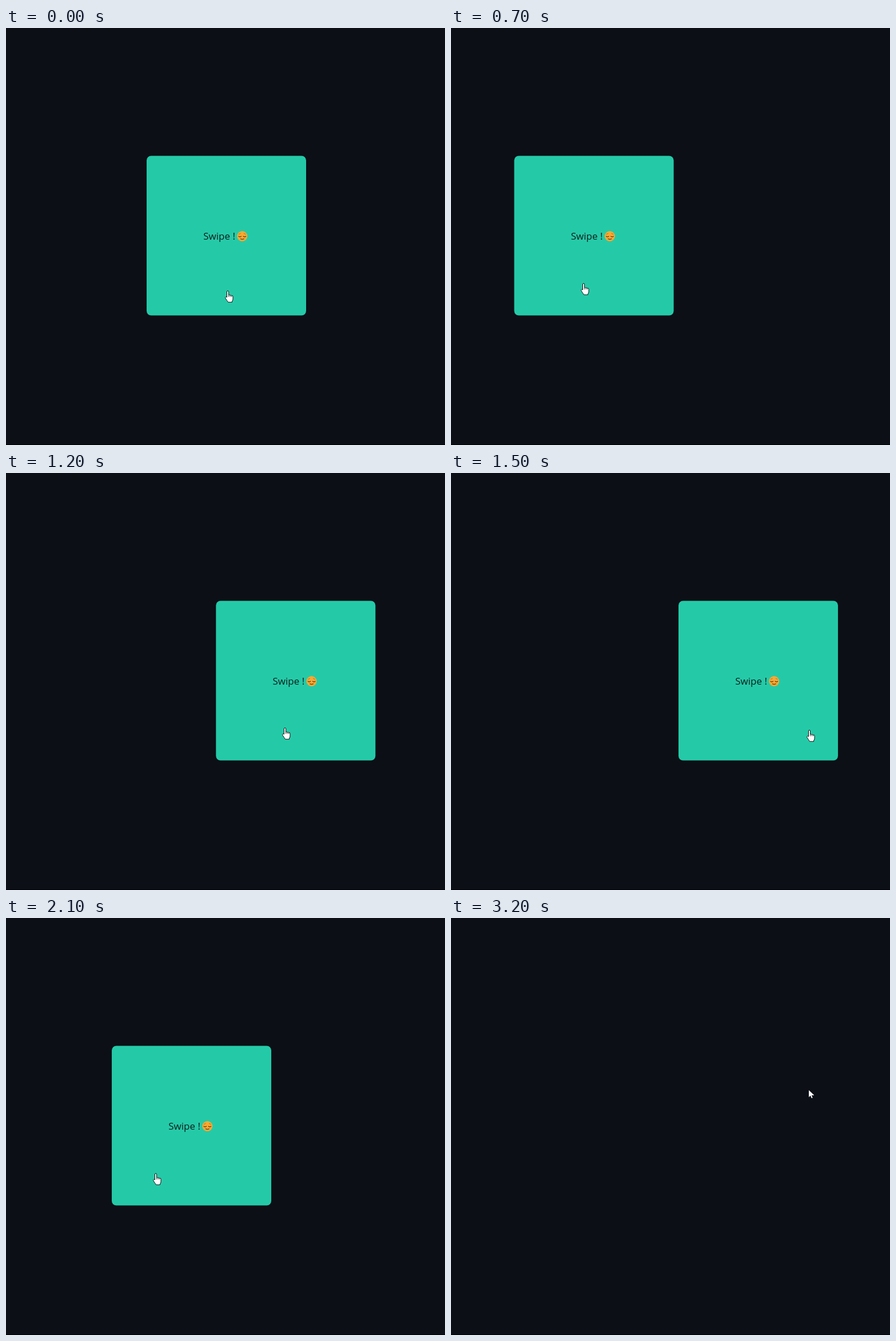
An HTML page for the animation above (3.3 s loop, 768 by 729 pixels).

```html
<!DOCTYPE html>
<html lang="en">
<head>
<meta charset="utf-8">
<title>Swipe card</title>
<style>
html, body { margin: 0; width: 100%; height: 100%; overflow: hidden; background: #0c0f16; }
svg { display: block; }
text { font: 17px "Open Sans", "Noto Sans", sans-serif; fill: #101c1b; }
</style>
</head>
<body>
<svg width="768" height="729" viewBox="0 0 768 729">
  <rect y="728" width="768" height="1" fill="#000"/>
  <g id="card">
    <rect y="223.5" width="279" height="279" rx="8" fill="#24caa8"/>
    <text x="99.2" y="369.6">Swipe !</text>
    <g transform="translate(167.3 364)" fill="none" stroke="#5a3a1c" stroke-linecap="round">
      <circle r="9" fill="#f8a832" stroke="none"/>
      <path d="M-6.3 .2q2.2 1.9 4.4 0M1.9 .2q2.2 1.9 4.4 0M-3 4.6q3 1.7 6 0" stroke-width="1.2"/>
      <path d="M-6-3.5l3-1.2M3-4.7l3 1.2" stroke-width=".8" stroke="#a86a22"/>
    </g>
  </g>
  <g id="hand" fill="#fff" stroke="#111" stroke-linejoin="round">
    <path d="M-1.5 11V1a1.5 1.5 0 0 1 3 0V7q1.2-1 2.6.4q1.4-.8 2.5.5q2.2-.6 2.4 1.5V14q0 2-1.5 4v1.3H.5Q-1 17-4 12.5Q-5 10.2-3.3 9.8Q-2.2 9.9-1.5 11Z"/>
    <path d="M1.5 7v3.2M4.1 7.4v2.8M6.6 7.9v2.3" stroke-width=".8"/>
  </g>
  <path id="arrow" d="M0 0V12.2L2.8 9.6 4.8 14 6.7 13.2 4.9 9H9V8.6Z" fill="#f8f8fa"/>
</svg>
<script>
const LOOP = 3300, STEP = 100, GONE = 2500;
const [card, hand, arrow] = ["card", "hand", "arrow"].map(id => document.getElementById(id));

const ease = u => (1 - Math.cos(Math.PI * Math.min(Math.max(u, 0), 1))) / 2;

// Each move is [start, duration, destination]; the value rests between moves
const glide = (t, from, ...moves) =>
  moves.reduce((at, [start, time, to]) => at + (to - at) * ease((t - start) / time), from);

const cardX = t => glide(t, 246, [309, 408, 110], [956, 312, 400], [1448, 962, 119]);
const pointerX = t => glide(t, 388, [150, 590, 230], [950, 420, 628], [1475, 800, 215],
  [2500, 300, 250], [2910, 290, 626]);
const pointerY = t => glide(t, 460, [300, 650, 441], [1000, 400, 450], [1900, 500, 441],
  [2500, 300, 521], [2910, 290, 301]);

const place = (el, x, y) => el.setAttribute("transform", `translate(${x} ${y})`);
const show = (el, on) => el.setAttribute("visibility", on ? "visible" : "hidden");

const start = performance.now();
function draw() {
  const t = Math.floor((performance.now() - start) % LOOP / STEP) * STEP;
  const x = Math.round(pointerX(t)), y = Math.round(pointerY(t));
  const active = t < GONE;
  place(card, cardX(t), 0);
  place(hand, x, y);
  place(arrow, x, y);
  show(card, active);
  show(hand, active);
  show(arrow, !active);
  requestAnimationFrame(draw);
}
draw();
</script>
</body>
</html>
```
